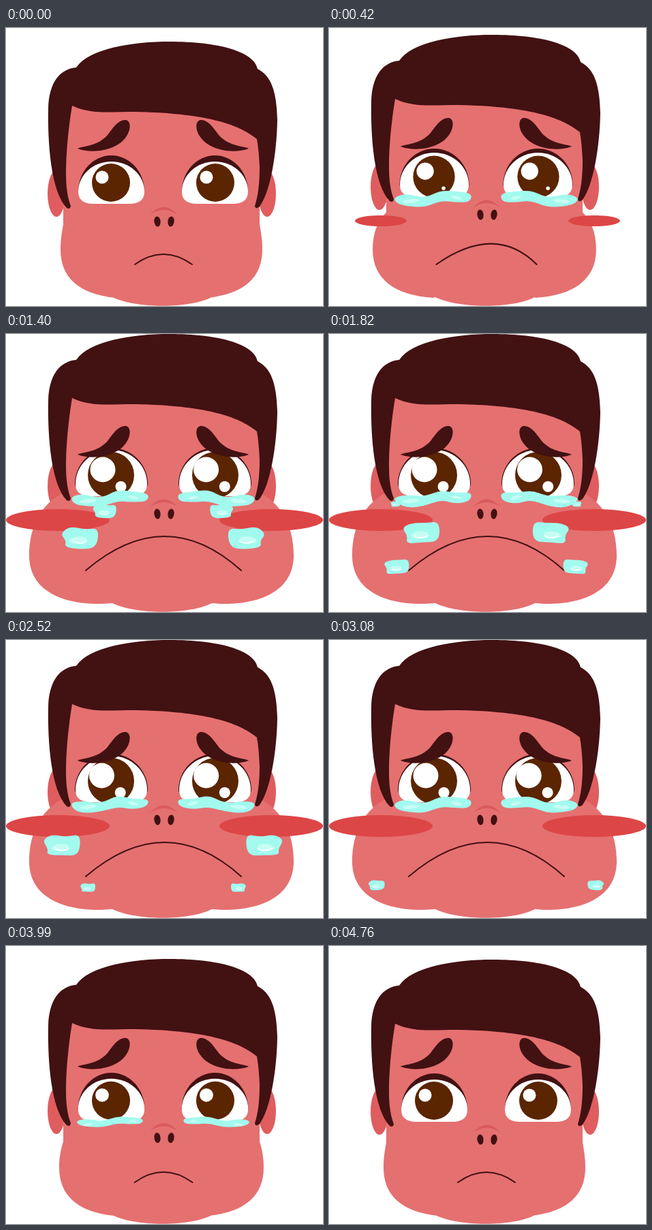
Write an HTML page with a canvas that moves like this. It is 465 px wide and 408 px high and loops after 4830 ms.

```html
<!DOCTYPE html>
<html lang="en">
<head>
<meta charset="utf-8">
<title>Crying face</title>
<style>
html, body { margin: 0; width: 100%; height: 100%; overflow: hidden; background: #fff; }
canvas { display: block; }
</style>
</head>
<body>
<canvas width="465" height="408"></canvas>
<script>
const ctx = document.querySelector('canvas').getContext('2d');
const LOOP = 4830, STEP = 70, MIRROR = 461;
const SKIN = '#e57070', EAR = '#df5d5f', DARK = '#421112', BLUSH = '#dd4646',
  IRIS = '#5a2500', NOSE = '#d95a5c', TEAR = '#a2faee', SHINE = '#c6fdf5';

const HAIR = new Path2D(`M97 114C91 150 86 200 89 235Q91 252 95 261Q94 267 89 264
  C66 240 61 170 62 118C63 80 79 60 103 58C122 30 185 20 240 20C310 20 364 34 369 60
  C388 70 397 90 398 135C397 185 388 240 372 262Q366 267 365 261Q372 240 372 205
  Q371 180 368 163C340 140 290 125 190 123C150 123 125 127 97 114Z`);
const BROW = new Path2D(`M105 177C110 173 133 175 149 157C157 146 165 134 176 135
  C184 137 183 150 176 160C164 178 130 186 105 177Z`);
const BRIDGE = new Path2D('M211 274Q231 251 252 274Q231 260 211 274Z');
const POOL = [[94, 0], [112, -5], [140, 0], [163, -11], [185, -8], [210, -7],
  [207, 6], [185, 8], [165, 4], [140, 13], [116, 14], [100, 9]];
const DROP = [[-1.15, -.4], [-.6, -1.1], [.3, -.95], [1, -1.05], [1.1, 0],
  [.9, 1], [.1, 1.15], [-.9, 1.1], [-.8, .3]];
const DROPS = [{ start: 600, x: 126 }, { start: 1110, x: 151 }, { start: 1700, x: 100 }];

const clamp = v => Math.max(0, Math.min(1, v));
const sine = v => (1 - Math.cos(Math.PI * v)) / 2;
const soft = v => (v + sine(v)) / 2;
// Rises from `up`, holds, then falls from `down`.
const hold = (t, up, rise, down, fall, ease = v => v) =>
  t < 2500 ? ease(clamp((t - up) / rise)) : 1 - ease(clamp((t - down) / fall));

function fill(color, path) {
  ctx.fillStyle = color;
  path ? ctx.fill(path) : ctx.fill();
}

function oval(color, x, y, rx, ry = rx, turn = 0) {
  ctx.beginPath();
  ctx.ellipse(x, y, rx, ry, turn, 0, 7);
  fill(color);
}

function shifted(dy, draw) {
  ctx.save();
  ctx.translate(0, dy);
  draw();
  ctx.restore();
}

function bothSides(draw) {
  draw();
  ctx.save();
  ctx.translate(MIRROR, 0);
  ctx.scale(-1, 1);
  draw();
  ctx.restore();
}

function blob(color, points) {
  const mid = (a, b) => [(a[0] + b[0]) / 2, (a[1] + b[1]) / 2];
  ctx.beginPath();
  ctx.moveTo(...mid(points.at(-1), points[0]));
  points.forEach((p, i) =>
    ctx.quadraticCurveTo(...p, ...mid(p, points[(i + 1) % points.length])));
  fill(color);
}

function jaw(j) {
  const l = 80 - 46 * j, r = 456 - l, x = 84 + 10 * j, top = 288 - 60 * j;
  const c1 = 82 - 30 * j, c1y = 300 - 55 * j, c2y = 310 - 28 * j;
  const low = 365 + 10 * j, c3 = 105 - 25 * j, c3y = 390 + 7 * j, end = 160 - 20 * j;
  fill(SKIN, new Path2D(`M${x} ${top}C${c1} ${c1y} ${l} ${c2y} ${l} 325
    C${l} ${low} ${c3} ${c3y} ${end} 396L156 395C190 412 270 412 302 395L${456 - end} 396
    C${456 - c3} ${c3y} ${r} ${low} ${r} 325C${r} ${c2y} ${456 - c1} ${c1y} ${456 - x} ${top}Z`));
}

function eyeShape(color, w, top, y, bottom) {
  const c = 154.5, k = .55, h = y - top;
  fill(color, new Path2D(`M${c - w} ${y}C${c - w} ${y - h * k} ${c - w * k} ${top} ${c} ${top}
    C${c + w * k} ${top} ${c + w} ${y - h * k} ${c + w} ${y}
    Q${c + w} ${bottom - 1} ${c + w - 20} ${bottom}H${c - w + 20}Q${c - w} ${bottom - 1} ${c - w} ${y}Z`));
}

function pupil(x, p, j, t) {
  const wob = p * Math.sin(t / 130 + x);
  oval(IRIS, x, 227 - 20 * p, 28 + 6 * p);
  oval('#fff', x - 13 + wob, 219 - 20 * p, 9.5 + 9 * j);
  oval('#fff', x + 14 + wob / 2, 244 - 20 * p, 8 * j);
}

function pool(size, p, t) {
  if (!size) return;
  const y = 258 - 18 * p;
  const place = ([x, dy], i) =>
    [152 + (x - 152) * (.6 + .4 * size), y + (dy + 1.5 * Math.sin(t / 140 + i * 2)) * size];
  blob(TEAR, POOL.map(place));
  oval(SHINE, 120, y + 5, 12 * size, 3 * size, -.1);
  oval(SHINE, 187, y, 8 * size, 2.5 * size, .2);
}

function drop({ start, x }, t) {
  const age = t - start;
  if (age <= 0 || age >= 1700) return;
  const w = 25 * Math.min(1, age / 450, (1700 - age) / 700);
  const cx = x - .022 * age, cy = 243 + .05 * age + 2.5e-5 * age * age;
  blob(TEAR, DROP.map(([dx, dy], i) =>
    [cx + dx * w, cy + (dy + .12 * Math.sin(t / 150 + i * 2)) * w * .56]));
  oval(SHINE, cx - w * .1, cy + w * .14, w * .5, w * .2, -.1);
  ctx.beginPath();
  ctx.ellipse(cx, cy + w * .08, w * .45, w * .24, 0, .5, 2.6);
  ctx.lineWidth = w * .07;
  ctx.strokeStyle = '#fff';
  ctx.stroke();
}

function draw(t) {
  const p = hold(t, 0, 840, 3220, 840, soft);
  const nose = hold(t, 0, 840, 3300, 840, soft);
  const j = hold(t, 0, 1050, 3080, 1050, sine);
  const m = hold(t, 0, 910, 3130, 910, sine);
  const b = hold(t, 0, 840, 3205, 575, t < 2500 ? soft : undefined);
  const wet = hold(t, 100, 300, 3850, 400);
  const lift = -20 * p;

  ctx.fillStyle = '#fff';
  ctx.fillRect(0, 0, 465, 408);
  shifted(lift, () => {
    oval(EAR, 74, 243, 13, 34);
    oval(EAR, 383, 243, 13, 34);
  });
  ctx.fillStyle = SKIN;
  ctx.fillRect(84, 105 + lift, 288, 225 - lift);
  jaw(j);
  shifted(lift, () => fill(DARK, HAIR));

  bothSides(() => {
    eyeShape(DARK, 48.5 + 5 * p, 187 + lift, 240 + lift, 250 + lift);
    eyeShape('#fff', 48.5 + 4 * p, 196 - 26 * p, 240 + lift, 258 + lift);
  });
  pupil(154, m, j, t);
  pupil(307, m, j, t);
  shifted(-3 * Math.sin(Math.PI * p) ** 3, () => bothSides(() => fill(DARK, BROW)));

  shifted(-20 * nose, () => {
    fill(NOSE, BRIDGE);
    oval(DARK, 222, 284, 4.6, 7.6, -.12);
    oval(DARK, 242, 284, 4.6, 7.6, .12);
  });

  ctx.beginPath();
  ctx.moveTo(189 - 72 * m, 347);
  ctx.quadraticCurveTo(231 + 3 * m + 12 * Math.sin(Math.PI * m), 317 - 70 * m, 273 + 72 * m, 347);
  ctx.lineWidth = 2;
  ctx.lineCap = 'round';
  ctx.strokeStyle = DARK;
  ctx.stroke();

  oval(BLUSH, 76, 293 + lift, 76 * b, 16 * b);
  oval(BLUSH, 389, 293 + lift, 76 * b, 16 * b);
  bothSides(() => {
    pool(wet, p, t);
    DROPS.forEach(d => drop(d, t));
  });
}

function frame() {
  draw(Math.floor(performance.now() % LOOP / STEP) * STEP);
  requestAnimationFrame(frame);
}
frame();
</script>
</body>
</html>
```
